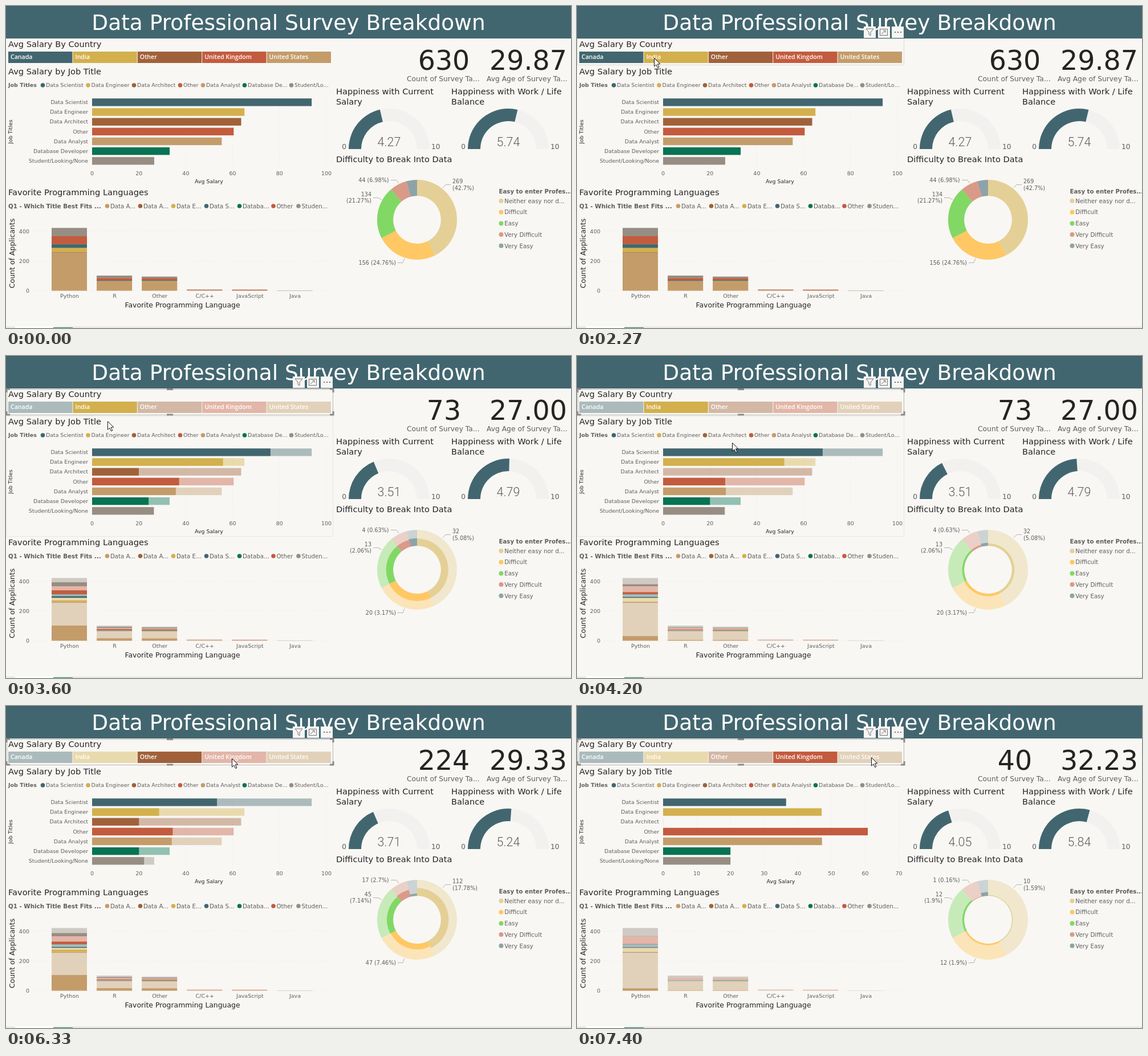
An HTML page with a canvas that plays this animation: 991x565 px, repeating every 8000 ms.

```html
<!DOCTYPE html>
<html lang="en">
<head>
<meta charset="utf-8">
<title>Survey dashboard</title>
<style>
  html, body { margin: 0; width: 100%; height: 100%; overflow: hidden; background: #f8f7f4; }
  canvas { display: block; }
</style>
</head>
<body>
<canvas id="stage" width="991" height="565"></canvas>
<script>
const ctx = document.getElementById('stage').getContext('2d');
const LOOP = 8000;
const SANS = '"DejaVu Sans", Verdana, sans-serif';
const HUMAN = '"Open Sans", "Noto Sans", sans-serif';
const INK = '#252423', GREY = '#605e5c', BACK = '#f8f7f4';
const TEAL = '#42666f', GOLD = '#d3b04d', BROWN = '#a0613a', RED = '#c35b3e',
      TAN = '#c49c6a', GREEN = '#077353', STONE = '#978d82';

// Four data states: everything, India, Other, United Kingdom
const clicks = [3190, 5400, 6800];
const loads = [3300, 5530, 6930];
const CHANGE = 480;
const selectedTile = [-1, 1, 2, 3];
const countries = ['Canada', 'India', 'Other', 'United Kingdom', 'United States'];
const tileColors = [TEAL, GOLD, BROWN, RED, TAN];
const people = ['630', '73', '224', '40'];
const ages = ['29.87', '27.00', '29.33', '32.23'];
const salaryHappy = [4.27, 3.51, 3.71, 4.05];
const balanceHappy = [5.74, 4.79, 5.24, 5.84];

const jobs = ['Data Scientist', 'Data Engineer', 'Data Architect', 'Other', 'Data Analyst',
              'Database Developer', 'Student/Looking/None'];
const jobColors = [TEAL, GOLD, BROWN, RED, TAN, GREEN, STONE];
const salaries = [
  [93.7, 65, 63.6, 60.4, 55.3, 33.1, 26.5],
  [68.1, 51.7, 0, 26.5, 26.8, 20, 26.2],
  [53.3, 28.6, 20, 34.4, 34, 20, 22.2],
  [36.5, 47.1, 0, 60.8, 47.2, 20, 20]
];

const languages = ['Python', 'R', 'Other', 'C/C++', 'JavaScript', 'Java'];
const stackColors = [TAN, BROWN, GOLD, TEAL, GREEN, RED, STONE];
const stacks = [
  [67, 1, 7.2, 6, .4, 13.9, 14.5],
  [16.8, .2, .2, 1.2, 0, 3.8, 4.3],
  [16, .2, .8, .3, .9, 3.3, 3.2],
  [1.1, 0, 0, 0, 0, .7, .2],
  [.8, 0, 0, 0, 0, 1, 0],
  [.2, 0, 0, 0, 0, 0, .3]
];
const stackShares = [
  [1, 1, 1, 1, 1, 1, 1],
  [.12, .5, .1, .25, .5, .25, .24],
  [.41, .5, .53, .25, .5, .32, .38],
  [.06, .5, .05, .15, .5, .02, .02]
];

const answers = ['Neither easy nor d...', 'Difficult', 'Easy', 'Very Difficult', 'Very Easy'];
const answerColors = ['#e4d096', '#ffc864', '#82d864', '#da9a88', '#8ea3a8'];
const answerCounts = [
  [269, 156, 134, 44, 27],
  [32, 20, 13, 4, 4],
  [112, 47, 45, 17, 3],
  [10, 12, 12, 1, 5]
];

// time, x, y of the pointer tip
const pointerPath = [
  [70, 988, 562], [870, 567, 322], [1530, 304, 215], [1730, 305, 190], [2270, 135, 91],
  [3350, 135, 91], [4000, 264, 161], [4200, 272, 152], [4730, 257, 91], [4870, 253, 89],
  [5600, 253, 89], [6070, 388, 101], [6200, 397, 101], [6330, 396, 92],
  [6950, 396, 92], [7400, 516, 90]
];

const clamp = v => Math.max(0, Math.min(1, v));
const ease = v => (v = clamp(v), v * v * (3 - 2 * v));
const mix = (a, b, p) => a + (b - a) * p;
const passed = (times, t) => times.filter(s => t >= s).length;

function text(s, x, y, size, { color = GREY, align = 'left', weight = 400, family = SANS } = {}) {
  ctx.font = `${weight} ${size}px ${family}`;
  ctx.fillStyle = color;
  ctx.textAlign = align;
  ctx.fillText(s, x, y + size * .365);   // y is the middle of the capitals
}
function upright(s, x, y, size) {
  ctx.save();
  ctx.translate(x, y);
  ctx.rotate(-Math.PI / 2);
  text(s, 0, 0, size, { color: INK, align: 'center' });
  ctx.restore();
}
function box(x, y, w, h, color, alpha = 1) {
  ctx.globalAlpha = alpha;
  ctx.fillStyle = color;
  ctx.fillRect(x, y, w, h);
  ctx.globalAlpha = 1;
}
function line(points, color, width = 1, dash = []) {
  ctx.beginPath();
  points.forEach(([x, y]) => ctx.lineTo(x, y));
  ctx.strokeStyle = color;
  ctx.lineWidth = width;
  ctx.setLineDash(dash);
  ctx.stroke();
  ctx.setLineDash([]);
}
function frame(x, y, w, h, color) {
  ctx.strokeStyle = color;
  ctx.lineWidth = 1;
  ctx.strokeRect(x, y, w, h);
}
function ring(x, y, inner, outer, from, to, color, alpha = 1) {
  ctx.globalAlpha = alpha;
  ctx.beginPath();
  ctx.arc(x, y, outer, from, to);
  ctx.arc(x, y, inner, to, from, true);
  ctx.fillStyle = color;
  ctx.fill();
  ctx.globalAlpha = 1;
}
function key(x, y, color, label, size, r = 3.8) {
  ctx.beginPath();
  ctx.arc(x, y, r, 0, 7);
  ctx.fillStyle = color;
  ctx.fill();
  text(label, x + r + 1.7, y, size);
}

function pointerAt(t) {
  const i = pointerPath.findIndex(k => k[0] > t);
  if (i === 0) return null;
  if (i < 0) return pointerPath.at(-1).slice(1);
  const [a, b] = [pointerPath[i - 1], pointerPath[i]];
  const p = ease((t - a[0]) / (b[0] - a[0]));
  return [mix(a[1], b[1], p), mix(a[2], b[2], p)];
}

function drawPage() {
  box(0, 0, 991, 565, BACK);
  box(0, 0, 991, 57, TEAL);
  box(0, 0, 991, 1, '#385b65');
  text('Data Professional Survey Breakdown', 495.5, 28.3, 37.5, { color: '#fff', align: 'center' });
  const heading = (s, x, y) => text(s, x, y, 14.6, { color: INK });
  heading('Avg Salary By Country', 4, 67);
  heading('Avg Salary by Job Title', 4, 115);
  heading('Favorite Programming Languages', 4, 326.5);
  heading('Happiness with Current', 579, 150);
  heading('Salary', 579, 168);
  heading('Happiness with Work / Life', 781, 150);
  heading('Balance', 781, 168);
  heading('Difficulty to Break Into Data', 579, 268.5);
  box(0, 562, 991, 3, '#eae9e5');
  box(16, 562, 67, 3, '#fff');
  box(83, 564, 34, 1, '#1b8074');
}

function drawTiles(selected) {
  countries.forEach((name, i) => {
    const x = 4 + i * 113.4;
    box(x, 80, 112.4, 20, tileColors[i], selected < 0 || selected === i ? 1 : .42);
    text(name, x + 4, 89.5, 10.6, { color: '#fff', weight: 600, family: HUMAN });
  });
}

function drawCards(k, loading) {
  const big = { color: INK, align: 'center' };
  text(people[k], 768, 95, 47.5, big);
  text(ages[k], 916, 95, 47.5, big);
  text('Count of Survey Ta...', 703, 128, 12.3, { color: loading ? '#4c6478' : GREY });
  text('Avg Age of Survey Ta...', 843, 128, 12.3);
  if (loading) [706, 846].forEach(x => box(x, 70, 2, 2, '#777'));
}

function drawGauge(x, value, label) {
  const y = 251, end = Math.PI * (1 + value / 10);
  ring(x, y, 49, 71, Math.PI, Math.PI * 2, '#f2f1f0');
  ring(x, y, 49, 71, Math.PI, end, TEAL);
  text('0', x - 75, 246.5, 12.2, { align: 'right' });
  text('10', x + 74, 246.5, 12.2);
  text(label.toFixed(2), x, 238.5, 21.5, { align: 'center', weight: 300, family: 'Roboto, sans-serif' });
}

function drawBars(k, blend) {
  const names = ['Data Scientist', 'Data Engineer', 'Data Architect', 'Other', 'Data Analyst',
                 'Database De...', 'Student/Lo...'];
  const keys = [64.5, 144, 224.5, 305.5, 345.5, 418.5, 500.5];
  text('Job Titles', 4, 139, 9.5, { weight: 700 });
  keys.forEach((x, i) => key(x, 139, jobColors[i], names[i], 9.4));

  const narrow = k === 3;
  const unit = blend([4.11, 4.11, 4.11, 5.91]);
  const [top, step] = narrow ? [70, 10] : [100, 20];
  for (let v = 0; v <= top; v += step) {
    const x = 151 + v * unit;
    if (v) line([[x, 158], [x, 286]], '#e3e1dd', 1, [1, 4]);
    text(v, x, 294, 9.5, { align: 'center' });
  }
  text('Avg Salary', narrow ? 357.5 : 356, 307.5, 9.4, { color: INK, align: 'center' });
  upright('Job Titles', 7.5, 220.5, 9.4);
  jobs.forEach((name, i) => {
    const y = 162.3 + i * 17.15;
    text(name, 144, y + 6.4, 9.4, { align: 'right' });
    box(151, y, salaries[0][i] * unit, 13.2, jobColors[i], blend([.42, .42, .42, 0]));
    box(151, y, blend(salaries.map(s => s[i])) * unit, 13.2, jobColors[i]);
  });
}

function drawColumns(blend) {
  const names = ['Data A...', 'Data A...', 'Data E...', 'Data S...', 'Databa...', 'Other', 'Studen...'];
  const colors = [TAN, BROWN, GOLD, TEAL, GREEN, RED, STONE];
  const keys = [177.5, 235.5, 293.5, 351.5, 409.5, 469, 513];
  text('Q1 - Which Title Best Fits ...', 4, 351, 10.3, { weight: 700 });
  keys.forEach((x, i) => key(x, 351, colors[i], names[i], 10.2));

  [0, 200, 400].forEach(v => {
    const y = 499.5 - v * .261;
    line([[47, y], [573, y]], '#e3e1dd', 1, [1, 4]);
    text(v, 41, y, 9.5, { align: 'right' });
  });
  upright('Count of Applicants', 10, 434, 12.5);
  text('Favorite Programming Language', 309.5, 524, 12.4, { color: INK, align: 'center' });

  const shares = stackColors.map((_, j) => blend(stackShares.map(s => s[j])));
  stacks.forEach((stack, i) => {
    const x = 80 + i * 79.1;
    let y = 499.5;
    stack.forEach((h, j) => {
      let share = shares[j];
      if (i && j === 0) share *= mix(.6, 1, share ** 3);
      box(x, y - h, 62, h, stackColors[j], .42);
      box(x, y - h * share, 62, h * share, stackColors[j]);
      y -= h;
    });
    text(languages[i], x + 31.5, 509, 9.5, { align: 'center' });
  });
}

function drawDonut(k, blend) {
  const x = 721, y = 375, inner = 42, outer = 70, total = 630;
  let from = -Math.PI / 2;
  answerCounts[0].forEach((n, i) => {
    const to = from + n / total * Math.PI * 2;
    const share = blend(answerCounts.map(c => c[i] / n));
    const reach = Math.sqrt(inner ** 2 + share * (outer ** 2 - inner ** 2));
    ring(x, y, inner, outer, from, to, answerColors[i], .42);
    ring(x, y, inner, reach, from, to, answerColors[i]);
    from = to;
  });

  const count = answerCounts[k];
  const percent = i => `(${+(count[i] / total * 100).toFixed(2)}%)`;
  const right = { align: 'right' };
  text(count[0], 783, 307.5, 9.6);
  text(percent(0), 783, 319.5, 9.6);
  text(`${count[1]} ${percent(1)}`, 684, 450, 9.6, right);
  text(count[2], 641, 330, 9.6, right);
  text(percent(2), 641, 341.5, 9.6, right);
  text(`${count[3]} ${percent(3)}`, 671.5, 305.5, 9.6, right);
  [
    [[780, 313.5], [771, 313.5], [766, 319]],
    [[687, 450.5], [696, 450.5], [699, 443]],
    [[644, 336.5], [653, 336.5], [659, 340]],
    [[675, 305.5], [685, 305.5], [689, 311]]
  ].forEach(points => line(points, '#b5b3b0'));

  text('Easy to enter Profes...', 864.5, 325, 10.2, { weight: 700 });
  answers.forEach((name, i) => key(868.5, 342 + i * 19.7, answerColors[i], name, 10.3, 4));
}

function drawHeaderIcons(right, y) {
  [71, 46, 22].forEach(d => box(right - d, y, 21, 20, '#f7f6f5'));
  const g = '#77746f', x = right - 71;
  line([[x + 4, y + 4], [x + 17, y + 4], [x + 12, y + 10], [x + 12, y + 16],
        [x + 9, y + 14], [x + 9, y + 10], [x + 4, y + 4]], g);
  frame(right - 42.5, y + 4.5, 13, 11, g);
  line([[right - 40, y + 13], [right - 33, y + 7]], g);
  line([[right - 37, y + 7], [right - 33, y + 7], [right - 33, y + 11]], g);
  [17, 12, 7].forEach(d => box(right - d, y + 9, 2, 2, g));
}

function drawSelection() {
  const g = '#8c8986';
  frame(1.5, 58.5, 572, 45, '#b9b6b2');
  [[1, 1], [574, -1]].forEach(([x, sx]) => [[58, 1], [103, -1]].forEach(([y, sy]) =>
    line([[x + 6 * sx, y], [x, y], [x, y + 6 * sy]], g, 3)));
  [58.5, 103].forEach(y => line([[282, y], [293, y]], g, 3));
}

function drawTooltip(name, x, y, alpha) {
  ctx.save();
  ctx.globalAlpha = alpha;
  ctx.font = `700 10px ${HUMAN}`;
  const w = 257 + ctx.measureText(name).width;
  ctx.fillStyle = 'rgba(46,44,43,.93)';
  ctx.beginPath();
  [[0, 0], [w, 0], [w, 59], [0, 59], [0, 18], [-7, 12], [0, 6]].forEach(([dx, dy]) => ctx.lineTo(x + dx, y + dy));
  ctx.fill();
  const soft = { color: '#d6d4d1', align: 'right', family: HUMAN };
  const bold = { color: '#fff', weight: 700, family: HUMAN };
  text('Q11 - Which Country do you live in?.1', x + 233, y + 22.5, 9.9, soft);
  text('Count of Q11 - Which Country do you live in?.1', x + 233, y + 38.5, 9.9, soft);
  text(name, x + 244, y + 22.5, 10, bold);
  text('1', x + 244, y + 38.5, 10, bold);
  ctx.restore();
}

function drawPointer([x, y]) {
  ctx.beginPath();
  [[0, 0], [0, 14.5], [3.4, 11.4], [6, 17], [8.4, 16], [5.8, 10.4], [10.4, 10.2]]
    .forEach(([dx, dy]) => ctx.lineTo(x + .5 + dx, y + .5 + dy));
  ctx.closePath();
  ctx.fillStyle = '#fff';
  ctx.fill();
  ctx.strokeStyle = '#111';
  ctx.lineWidth = 1;
  ctx.stroke();
}

function draw(now) {
  const t = now % LOOP;
  const k = passed(loads, t);
  const clicked = passed(clicks, t);
  const p = k ? ease((t - loads[k - 1]) / CHANGE) : 1;
  const blend = values => k ? mix(values[k - 1], values[k], p) : values[0];
  const pointer = pointerAt(t);
  const over = (x, y, w, h) => pointer && pointer[0] >= x && pointer[0] < x + w &&
                               pointer[1] >= y && pointer[1] < y + h;

  drawPage();
  drawTiles(selectedTile[clicked]);
  drawCards(k, clicked > k);
  drawGauge(672, blend(salaryHappy), salaryHappy[k]);
  drawGauge(881, blend(balanceHappy), balanceHappy[passed(loads, t + 80)]);
  drawBars(k, blend);
  drawColumns(blend);
  drawDonut(k, blend);

  if (over(0, 105, 574, 212)) frame(.5, 105.5, 573, 211, '#e8e6e3');
  if (over(576, 262, 415, 270)) {
    frame(576.5, 262.5, 411, 268, '#e8e6e3');
    drawHeaderIcons(988, 242);
  }
  if (clicked) drawSelection();
  else if (over(0, 57, 574, 47)) frame(.5, 57.5, 573, 46, '#dedcd9');
  if (clicked || over(0, 57, 574, 47)) drawHeaderIcons(574, 36);

  [['India', 160, 80, 2640, 3400], ['Other', 277, 77, 5250, 5600], ['United Kingdom', 420, 80, 6710, 6980]]
    .forEach(([name, x, y, start, end]) => {
      if (t >= start && t < end) drawTooltip(name, x, y, clamp((t - start) / 150));
    });
  if (pointer) drawPointer(pointer);
  requestAnimationFrame(draw);
}
requestAnimationFrame(draw);
</script>
</body>
</html>
```
